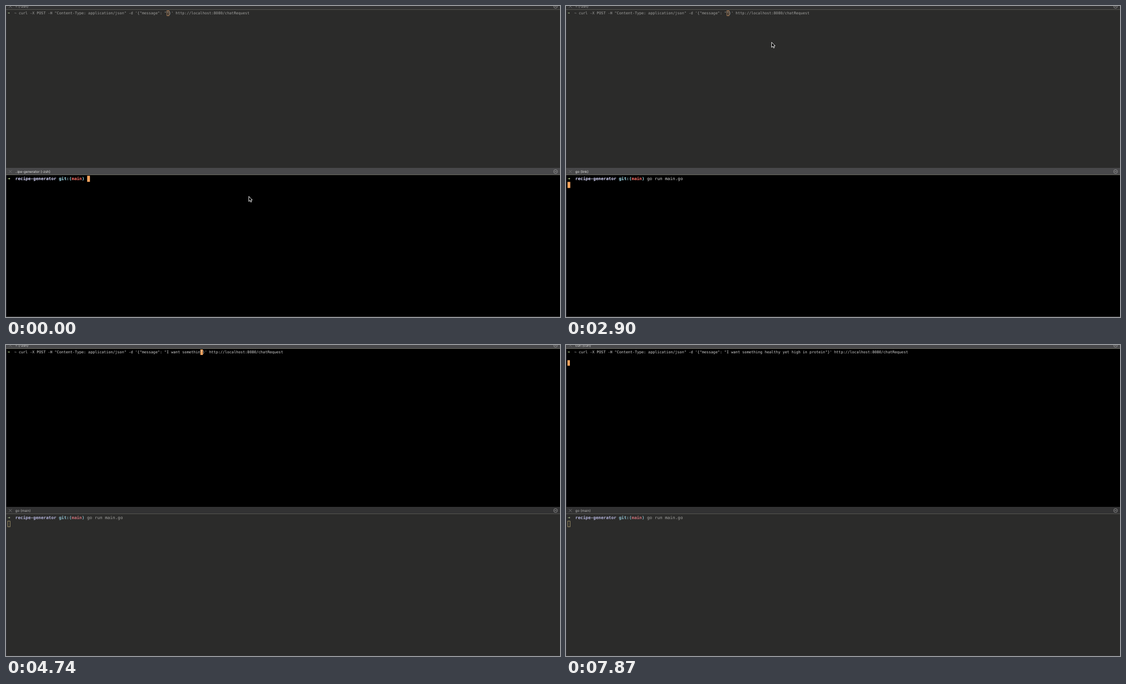
Recreate the animation shown at these times as an HTML page. Size 998 by 561 pixels, loop 8000 ms.

```html
<!DOCTYPE html>
<html lang="en">
<head>
<meta charset="utf-8">
<title>Split terminal</title>
<style>
  html, body { margin: 0; width: 100%; height: 100%; overflow: hidden; background: #000; }
  svg { display: block; width: 100%; height: 100%; }
  text { white-space: pre; text-rendering: geometricPrecision; font-family: "DejaVu Sans Mono", monospace; }
  .title { font: 6.2px Inter, sans-serif; }
  .bold { font-weight: 700; }
</style>
</head>
<body>
<svg id="stage" viewBox="0 0 998 561" preserveAspectRatio="none">
  <g id="top"></g>
  <g id="bottom"></g>
  <path id="mouse" d="M0 0V9.2L2.1 7.2L3.6 10.4L5.1 9.7L3.7 6.6H6.4Z" fill="#000" stroke="#fff" stroke-width=".9"/>
</svg>
<script>
const LOOP = 8000;
const FOCUS_TOP = 2940, RUN = 1900, SEND = 7100;
const MESSAGE = 'I want something healthy yet high in protein';
const COMMAND = 'go run main.go';

// Key times: [ms, characters typed]
const MESSAGE_KEYS = [[3640, 0], [4735, 15], [5505, 31], [6500, 44]];
const COMMAND_KEYS = [[400, 0], [1450, 12], [1640, 14]];

const BRIGHT = { bg: '#000', bar: '#48484a', line: '#68685f', title: '#e2e2e2', text: '#d4d4d4',
  arrow: '#d2efa6', dir: '#d9d9ff', git: '#a9e4f2', branch: '#ff7068', icon: '#777' };
const DIM = { bg: '#2b2b2a', bar: '#323233', line: '#555550', title: '#b0b0b0', text: '#a2a2a0',
  arrow: '#a9bd94', dir: '#b4b4dc', git: '#8dbccb', branch: '#cb7078', icon: '#858585' };

const top_ = document.getElementById('top');
const bottom = document.getElementById('bottom');
const mouse = document.getElementById('mouse');

function typed(t, keys) {
  for (let i = 1; i < keys.length; i++) {
    const [t0, n0] = keys[i - 1], [t1, n1] = keys[i];
    if (t < t1) return Math.floor(n0 + (n1 - n0) * Math.max(0, (t - t0) / (t1 - t0)));
  }
  return keys[keys.length - 1][1];
}

const rect = (x, y, w, h, fill) => `<rect x="${x}" y="${y}" width="${w}" height="${h}" fill="${fill}"/>`;

const span = (text, fill, bold) => `<tspan fill="${fill}"${bold ? ' class="bold"' : ''}>${text}</tspan>`;

const line = (x, y, size, spans) => `<text x="${x}" y="${y}" font-size="${size}">${spans}</text>`;

function cursor(x, y, w, h, active, outline) {
  return active
    ? rect(x, y, w, h, '#faa55f')
    : `<rect x="${x + .4}" y="${y + .4}" width="${w - .8}" height="${h - .8}" fill="none" stroke="${outline}" stroke-width=".8"/>`;
}

function frame(y, height, title, c) {
  return rect(0, y, 998, height, c.bg) +
    rect(0, y, 998, 12.5, c.bar) +
    rect(0, y + 12, 998, 1, c.line) +
    rect(0, y + 13, .8, height - 13, '#34343c') +
    `<path d="M5 ${y + 3.8}l5.6 5.6m0 -5.6l-5.6 5.6" stroke="${c.icon}" stroke-width=".7"/>` +
    `<text class="title" x="16.7" y="${y + 8.9}" fill="${c.title}">${title}</text>` +
    `<g fill="none" stroke="#aaa" stroke-width=".7"><circle cx="990" cy="${y + 6.6}" r="3.4"/>` +
    `<path d="M988 ${y + 6.6}h4"/></g>`;
}

function topPane(t) {
  const active = t >= FOCUS_TOP, sent = t >= SEND, c = active ? BRIGHT : DIM;
  const count = typed(t, MESSAGE_KEYS), cell = 4.04;
  const command = `~ curl -X POST -H "Content-Type: application/json" -d '{"message": "` +
    `${MESSAGE.slice(0, count)}"}' http://localhost:8080/chatRequest`;
  const caret = sent
    ? cursor(2.6, 27.4, 4.4, 10, active)
    : cursor(23 + (66 + count) * cell, 8, 4.4, 10, active, '#d39a68');
  return frame(-6, 298, sent ? 'curl (curl)' : '~ (-zsh)', c) + caret +
    line(2.8, 15.2, 6.71, span('➜', c.arrow, true) + span('  ' + command, c.text));
}

function bottomPane(t) {
  const active = t < FOCUS_TOP, running = t >= RUN, c = active ? BRIGHT : DIM;
  const count = typed(t, COMMAND_KEYS), cell = 4.62;
  const title = t < RUN ? '..ipe-generator (-zsh)' : t < 2350 ? 'go (go)' : t < 3150 ? 'go (link)' : 'go (main)';
  const caret = running
    ? cursor(2.7, 317.3, 5, 11, active, '#b3a475')
    : cursor(146.2 + count * cell, 306.2, 5, 11, active);
  const prompt = span('➜  ', c.arrow, true) + span('recipe-generator ', c.dir, true) +
    span('git:(', c.git, true) + span('main', c.branch, true) + span(') ', c.git, true);
  return frame(292, 269, title, c) + rect(0, 560, 998, 1, '#333') + caret +
    line(3, 314.4, 7.67, prompt + span(COMMAND.slice(0, count), c.text));
}

function update(group, markup) {
  if (group.markup !== markup) group.innerHTML = group.markup = markup;
}

function draw(now) {
  const t = now % LOOP;
  update(top_, topPane(t));
  update(bottom, bottomPane(t));
  const p = Math.min(1, Math.max(0, (t - 2100) / 600));
  const ease = p * p * (3 - 2 * p);
  mouse.setAttribute('transform', `translate(${437.4 - 67 * ease} ${343.4 - 278 * ease})`);
  mouse.style.display = t < 400 || (t >= 2100 && t < 3640) ? '' : 'none';
}

const start = performance.now();
function tick() {
  draw(performance.now() - start);
  requestAnimationFrame(tick);
}
tick();
</script>
</body>
</html>
```
